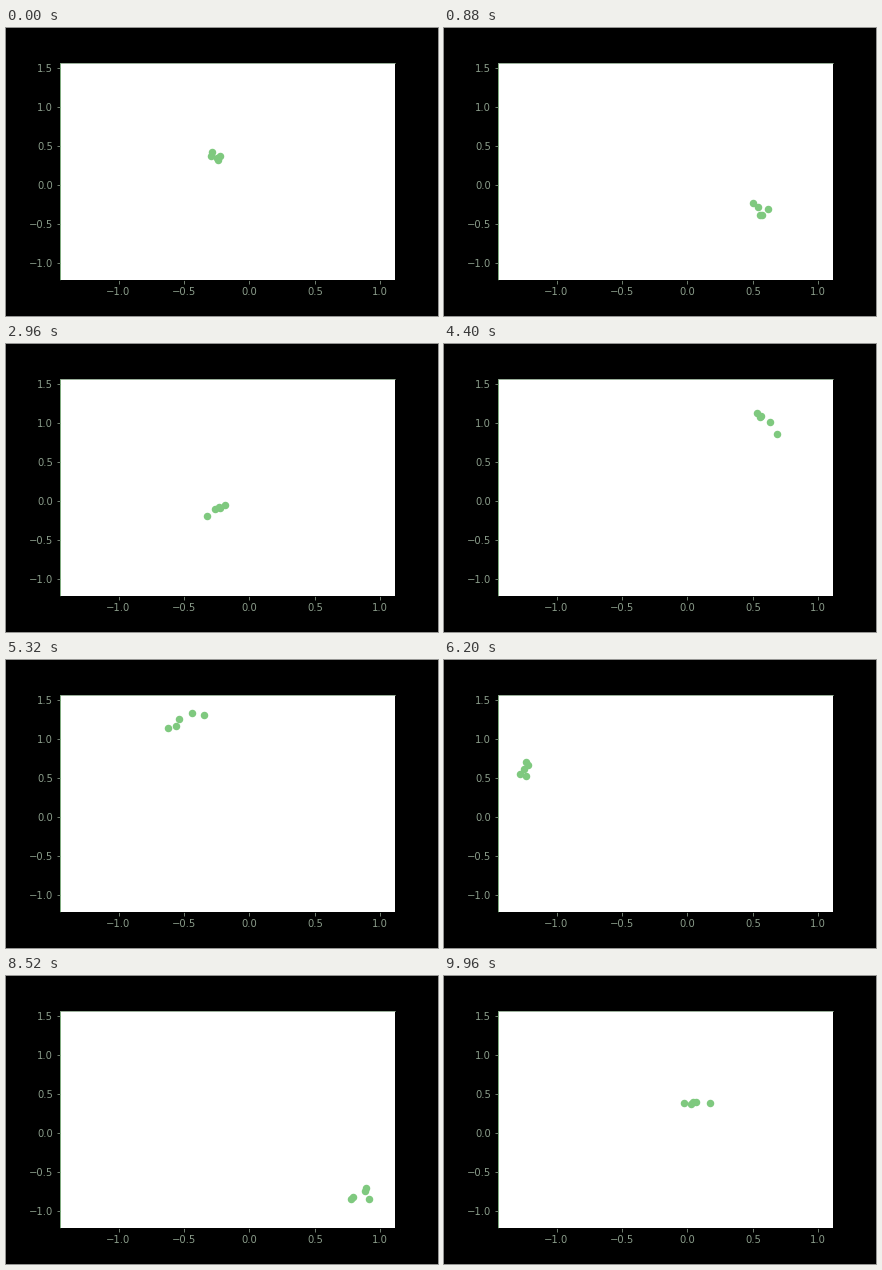
A matplotlib script that plays this animation: 432x288 px, repeating every 10000 ms.

```python
import numpy as np
import matplotlib.pyplot as plt
from matplotlib.animation import FuncAnimation

W, H, DPI = 432, 288, 72
FRAMES, STEP = 250, 40
WINDOW = 5   # frames each point stays visible
SPACING = 13  # frames between key points
XLIM, YLIM = (-1.447, 1.111), (-1.215, 1.572)
LEFT, RIGHT, BOTTOM, TOP = 0.125, 0.9, 0.125, 0.88
GREEN, PALE = "#7fc97f", "#8a9c8a"

# Closed route of the walk in stage pixels, evenly spaced in time
ROUTE = np.array([
    (208, 125), (268, 155), (319, 188), (264, 232), (210, 229),
    (177, 192), (219, 161), (290, 135), (333, 101), (300, 62),
    (206, 50), (135, 83), (80, 110), (105, 160), (170, 215),
    (245, 236), (322, 229), (370, 203), (344, 155), (274, 131),
], float)


def route_at(t):
    """Catmull-Rom curve through the closed route."""
    k, u = np.divmod(t / SPACING, 1)
    u = u[:, None]
    a, b, c, d = (ROUTE[(k.astype(int) + j) % len(ROUTE)]
                  for j in (-1, 0, 1, 2))
    return b + u / 2 * (c - a + u * (2 * a - 5 * b + 4 * c - d
                                     + u * (3 * (b - c) + d - a)))


def to_data(pixels):
    u = (pixels[:, 0] / W - LEFT) / (RIGHT - LEFT)
    v = (1 - pixels[:, 1] / H - BOTTOM) / (TOP - BOTTOM)
    return np.column_stack([XLIM[0] + u * (XLIM[1] - XLIM[0]),
                            YLIM[0] + v * (YLIM[1] - YLIM[0])])


rng = np.random.default_rng(4)
times = np.arange(FRAMES + WINDOW, dtype=float)
walk = route_at(times) + rng.normal(0, 3.5, (len(times), 2))
points = to_data(np.clip(walk, (69.5, 44.5), (373.5, 242)))

fig = plt.figure(figsize=(W / DPI, H / DPI), dpi=DPI, facecolor="black")
ax = fig.add_axes([LEFT, BOTTOM, RIGHT - LEFT, TOP - BOTTOM], facecolor="white")
ax.set(xlim=XLIM, ylim=YLIM,
       xticks=np.arange(-1, 1.1, 0.5), yticks=np.arange(-1, 1.6, 0.5))
ax.tick_params(length=3.5, width=0.8, pad=3.5, color=PALE,
               labelcolor=PALE, labelsize=10, labelfontfamily="DejaVu Sans")
for side, color in dict(left="#5f965f", top="#809a80",
                        right="black", bottom="black").items():
    ax.spines[side].set(color=color, linewidth=0.8)

dots = ax.scatter([], [], s=36, color=GREEN, linewidths=1.5)


def update(i):
    dots.set_offsets(points[i:i + WINDOW])
    return (dots,)


anim = FuncAnimation(fig, update, frames=FRAMES, interval=STEP,
                     repeat=True, repeat_delay=0, blit=False)
plt.show()
```
